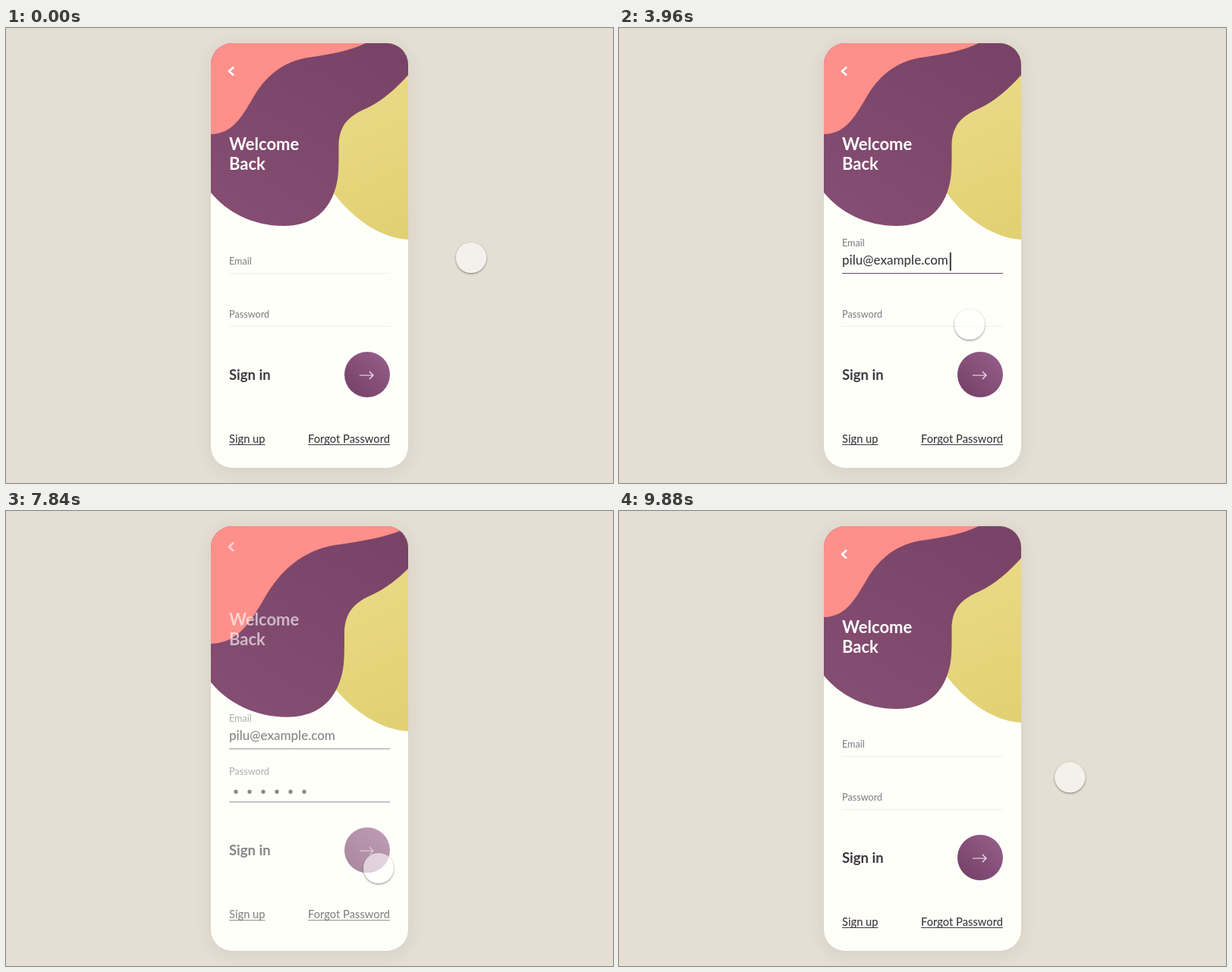
These frames come from a looping animation (800 by 600 pixels, 9920 ms). An HTML page with a canvas:

```html
<!DOCTYPE html>
<html lang="en">
<head>
<meta charset="utf-8">
<title>Sign in</title>
<style>
html, body { margin: 0; width: 100%; height: 100%; overflow: hidden; background: #e4ded3; }
canvas { display: block; width: 800px; height: 600px; }
</style>
</head>
<body>
<canvas id="stage" width="800" height="600"></canvas>
<script>
const ctx = document.getElementById('stage').getContext('2d');
const LOOP = 9920, RESET = 8450, SHIFT = 60;
const EMAIL = 'pilu@example.com';
const DARK = '#3e3a3f', GREY = '#878388', WHITE = '#fffffa';

const clamp = v => Math.max(0, Math.min(1, v));
const mix = (a, b, k) => a + (b - a) * k;
const phase = (t, start, length) => clamp((t - start) / length);
const ease = k => k < 0.5 ? 4 * k ** 3 : 1 - (2 - 2 * k) ** 3 / 2;
const move = (t, start, length) => ease(phase(t, start, length));

const coral = new Path2D('M270 20V140C300 140 313 113 328 88C345 60 370 42 402 38.5C432 34 453 30 474 20Z');
const purple = new Path2D('M270 20H562C552 35 541 49 530 62C514 80 496 96 475 106C452 116 438 128 438.5 158C438.5 183 439 201 432 218C422 245 400 261 366 261C325 261 290 242 270 217Z');
const yellow = new Path2D('M530 20H400V160C408 185 420 204 432 218C457 251 493 277 530 279Z');

function gradient(x0, y0, x1, y1, from, to) {
  const g = ctx.createLinearGradient(x0, y0, x1, y1);
  g.addColorStop(0, from);
  g.addColorStop(1, to);
  return g;
}
const purpleFill = gradient(480, 20, 330, 261, '#794367', '#844d71');
const yellowFill = gradient(450, 100, 530, 279, '#e9d983', '#e1d072');
const buttonFill = gradient(455, 480, 497, 434, '#77426a', '#935c87');

function text(value, x, y, size, weight, color, align = 'left') {
  ctx.font = `${weight} ${size}px Lato, "Open Sans", sans-serif`;
  ctx.textAlign = align;
  ctx.fillStyle = color;
  ctx.fillText(value, x, y);
  return ctx.measureText(value).width;
}

function stroke(points, color, width) {
  ctx.beginPath();
  points.forEach(([x, y]) => ctx.lineTo(x, y));
  ctx.strokeStyle = color;
  ctx.lineWidth = width;
  ctx.stroke();
}

function disc(x, y, r, fill) {
  ctx.beginPath();
  ctx.arc(x, y, r, 0, Math.PI * 2);
  ctx.fillStyle = fill;
  ctx.fill();
}

function layer(alpha, dy, draw) {
  ctx.save();
  ctx.globalAlpha *= alpha;
  ctx.translate(0, dy);
  draw();
  ctx.restore();
}

function blob(path, fill, originX, scale) {
  ctx.save();
  ctx.translate(originX, 20);
  ctx.scale(scale, scale);
  ctx.translate(-originX, -20);
  ctx.fillStyle = fill;
  ctx.fill(path);
  ctx.restore();
}

function drawBlobs(t) {
  const grow = 1.4 * (t < RESET ? move(t, 7650, 800) : 1 - move(t, RESET, 640));
  blob(yellow, yellowFill, 530, 1 + 0.58 * grow);
  blob(purple, purpleFill, 270, 1 + 0.58 * grow);
  blob(coral, '#ff8f8a', 270, 1 + 3.83 * grow);
}

// Each group drops back into place on its own delay once the form is reset.
function group(t, start, draw) {
  const k = t < RESET ? 1 : phase(t, start, 600);
  layer(clamp(k * 1.4), -SHIFT * (1 - ease(k)), draw);
}

function line(t, y, start, focus) {
  const k = t < RESET ? 1 : phase(t, start, 600);
  layer(clamp(k * 1.4), 0, () => {
    ctx.fillStyle = '#efede9';
    ctx.fillRect(294, y, 212, 1);
    ctx.globalAlpha *= focus;
    ctx.fillStyle = '#64525f';
    ctx.fillRect(294, y, 212, 1);
  });
}

function caret(t, x, y, typing) {
  if (!typing && t % 1000 >= 400 && t % 1000 < 850) return;
  ctx.fillStyle = DARK;
  ctx.fillRect(x, y, 2, 24);
}

function link(value, x, align) {
  const width = text(value, x, 547, 14.7, 500, DARK, align);
  ctx.fillRect(align === 'right' ? x - width : x, 549, width, 1);
}

function drawForm(t) {
  const fresh = t >= RESET;
  const emailFocus = fresh ? 0 : move(t, 1080, 300);
  const passFocus = fresh ? 0 : move(t, 4080, 300);

  group(t, 8960, () => {
    ctx.lineCap = 'butt';
    stroke([[300, 51.5], [294, 57], [300, 62.5]], '#fff', 2.6);
  });
  group(t, 8870, () => {
    text('Welcome', 294, 161, 22, 700, '#fff');
    text('Back', 294, 187, 22, 700, '#fff');
  });
  group(t, 8850, () => text('Email', 294, 312 - 24 * emailFocus, 12.6, 500, GREY));
  group(t, 8689, () => text('Password', 294, 382 - 24 * passFocus, 12.6, 500, GREY));
  line(t, 323, 8850, emailFocus);
  line(t, 393, 8689, passFocus);

  if (!fresh) {
    const emailKeys = Math.floor(phase(t, 1600, 1500) * EMAIL.length);
    const width = text(EMAIL.slice(0, emailKeys), 294, 312, 17, 500, DARK);
    if (t > 1500 && t < 4080) caret(t, 296 + width, 296, t < 3200 || t > 3700);
    const dots = Math.floor(phase(t, 4600, 1300) * 6);
    for (let i = 0; i < dots; i++) disc(303 + 18 * i, 380, 2.6, DARK);
    if (t > 4400 && t < 7550) caret(t, 297 + 18 * dots, 366, t < 6000 || t > 6700 && t < 7100);
  }

  group(t, 8612, () => {
    text('Sign in', 294, 464, 18.5, 700, DARK);
    disc(476, 457, 30, buttonFill);
    stroke([[466, 458], [484, 458]], '#f6edf3', 1.2);
    stroke([[479, 453], [484, 458], [479, 463]], '#f6edf3', 1.2);
  });
  group(t, 8552, () => {
    link('Sign up', 294, 'left');
    link('Forgot Password', 506, 'right');
  });
}

// Start time, duration, control point, end point.
const moves = [
  [200, 850, 550, 340, 471, 319],
  [3200, 600, 474, 357, 462, 391],
  [6950, 550, 464, 436, 491, 471],
  [9400, 796, 583, 405, 613, 303]
];

function pointer(t) {
  let x = 613, y = 303;
  for (const [start, length, cx, cy, ex, ey] of moves) {
    if (t < start) break;
    const k = move(t, start, length);
    x = mix(mix(x, cx, k), mix(cx, ex, k), k);
    y = mix(mix(y, cy, k), mix(cy, ey, k), k);
  }
  return [x, y];
}

function drawPointer(t) {
  const [x, y] = pointer(t);
  ctx.save();
  ctx.beginPath();
  ctx.rect(0, 0, 800, 600);
  ctx.arc(x, y, 20, 0, Math.PI * 2);
  ctx.clip('evenodd');
  ctx.shadowColor = 'rgba(40, 35, 30, .6)';
  ctx.shadowBlur = 2.5;
  ctx.shadowOffsetY = 1;
  disc(x, y, 20, '#fff');
  ctx.restore();
  disc(x, y, 20, 'rgba(255, 255, 255, .6)');
}

function drawCard(t) {
  const card = new Path2D();
  card.roundRect(270, 20, 260, 560, 28);
  ctx.save();
  ctx.shadowColor = 'rgba(90, 75, 60, .1)';
  ctx.shadowBlur = 22;
  ctx.shadowOffsetY = 4;
  ctx.fillStyle = WHITE;
  ctx.fill(card);
  ctx.restore();
  ctx.save();
  ctx.clip(card);
  drawBlobs(t);
  const leaving = t < RESET ? phase(t, 7600, 700) : 0;
  layer(clamp(1 - 1.1 * leaving), -SHIFT * ease(leaving), () => drawForm(t));
  ctx.restore();
}

const begin = performance.now();
function frame() {
  const t = (performance.now() - begin) % LOOP;
  ctx.fillStyle = '#e4ded3';
  ctx.fillRect(0, 0, 800, 600);
  drawCard(t);
  drawPointer(t);
  requestAnimationFrame(frame);
}
frame();
</script>
</body>
</html>
```
